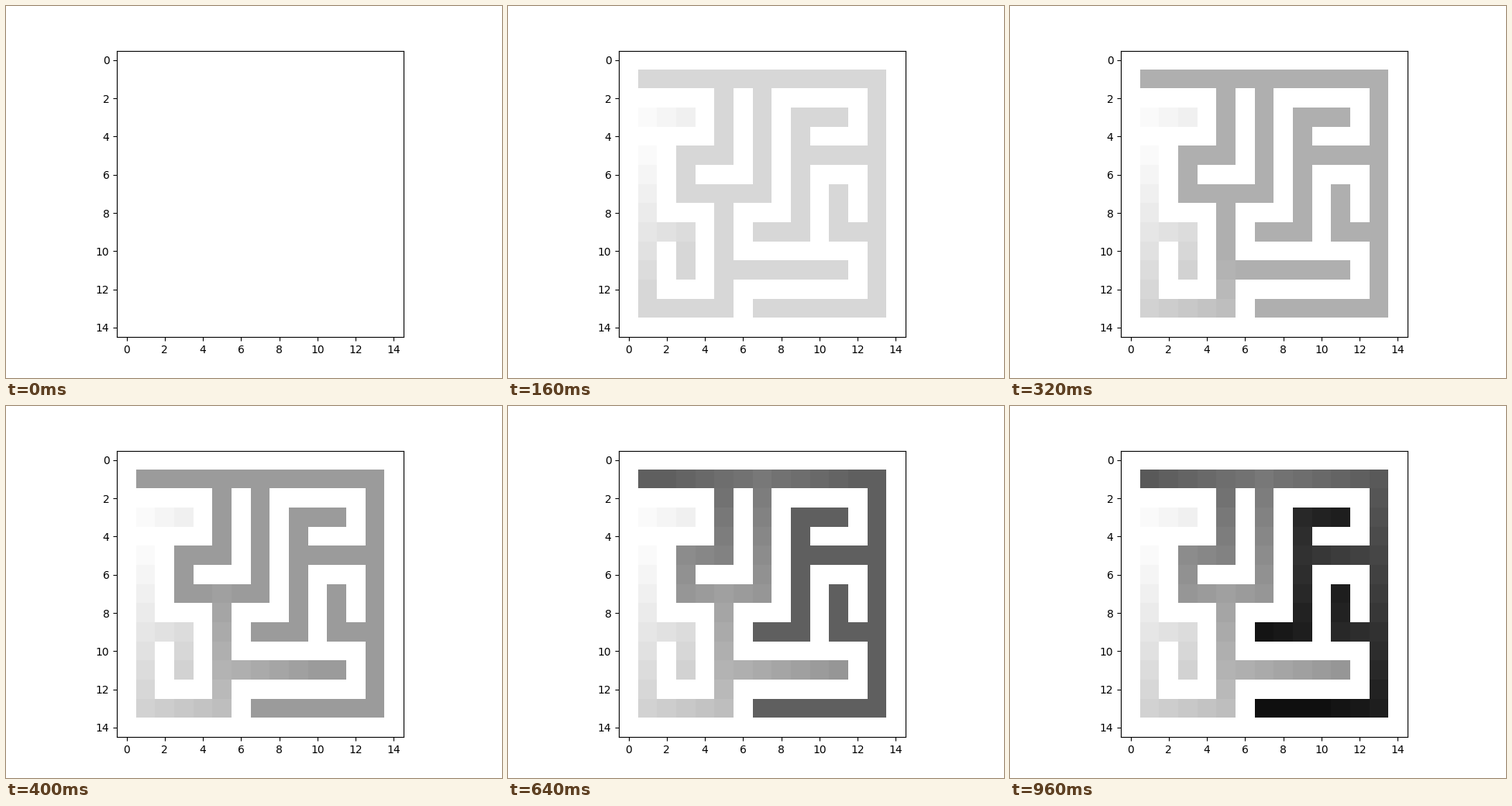
Write a matplotlib script that moves like this. It is 640 px wide and 480 px high and loops after 1040 ms.

```python
import numpy as np
import matplotlib.pyplot as plt
from matplotlib.animation import FuncAnimation

ROOMS = 7
SIZE = 2 * ROOMS + 1
START = (4, 1)
STEPS_PER_FRAME = 4


def carve(maze, room, *turns):
    """Open a corridor from a room (row, column), turning at each stop.

    The stops are alternately a column to walk to and a row to walk to.
    """
    row, col = room
    for i, stop in enumerate(turns):
        next_row, next_col = (stop, col) if i % 2 else (row, stop)
        top, bottom = sorted((row, next_row))
        left, right = sorted((col, next_col))
        maze[2 * top + 1:2 * bottom + 2, 2 * left + 1:2 * right + 2] = True
        row, col = next_row, next_col


def build_maze():
    maze = np.zeros((SIZE, SIZE), dtype=bool)
    # One long winding corridor, then its side branches
    carve(maze, (1, 1), 0, 6, 2, 3, 1, 2, 2, 0, 6, 6, 3)
    carve(maze, (3, 2), 3, 0, 0)
    carve(maze, (4, 0), 1, 5)
    carve(maze, (5, 2), 5)
    carve(maze, (2, 6), 4)
    carve(maze, (1, 5), 4, 4, 3)
    carve(maze, (4, 6), 5, 3)
    return maze


def flood(maze, start):
    """Breadth-first distance of every open cell from the start."""
    distance = np.zeros(maze.shape, dtype=int)
    seen = {start}
    queue = [start]
    for r, c in queue:
        for cell in ((r - 1, c), (r + 1, c), (r, c - 1), (r, c + 1)):
            if maze[cell] and cell not in seen:
                seen.add(cell)
                distance[cell] = distance[r, c] + 1
                queue.append(cell)
    return distance


distance = flood(build_maze(), START)
longest = distance.max()

fig, ax = plt.subplots(figsize=(6.4, 4.8), dpi=100)
image = ax.imshow(np.zeros_like(distance), cmap="binary", vmin=0, vmax=longest)


def update(frame):
    # Cells not reached yet share the shade of the advancing front
    image.set_data(np.minimum(distance, frame * STEPS_PER_FRAME))
    return [image]


anim = FuncAnimation(fig, update, frames=longest // STEPS_PER_FRAME + 1,
                     interval=80, repeat=True, repeat_delay=0)
plt.show()
```
